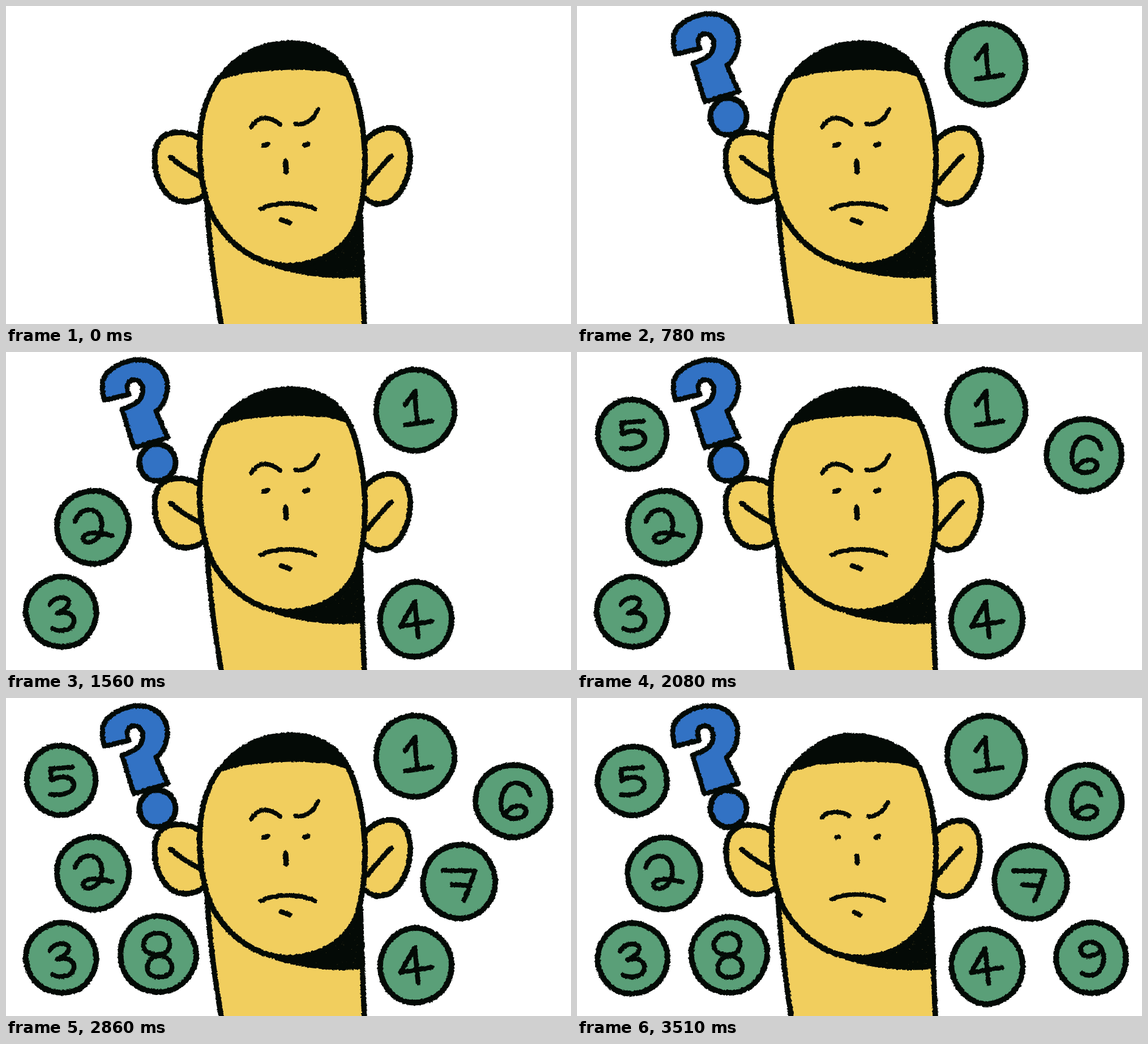
These frames come from a looping animation (998x561 px, 3640 ms). An HTML page:

```html
<!DOCTYPE html>
<html lang="en">
<head>
<meta charset="utf-8">
<title>Counting thoughts</title>
<style>
html, body { margin: 0; width: 100%; height: 100%; overflow: hidden; background: #fff; }
svg { display: block; width: 100vw; height: 100vh; }
path { stroke-linecap: round; stroke-linejoin: round; }
</style>
</head>
<body>
<svg viewBox="0 0 998 561">
  <filter id="rough" filterUnits="userSpaceOnUse" x="0" y="0" width="998" height="580" color-interpolation-filters="sRGB">
    <feTurbulence id="noise" type="fractalNoise" baseFrequency=".25" numOctaves="2" seed="1"/>
    <feDisplacementMap in="SourceGraphic" scale="4" xChannelSelector="R" yChannelSelector="G"/>
  </filter>
  <g id="art" filter="url(#rough)"></g>
</svg>
<script>
const INK = '#040a06', SKIN = '#f1ce5e', GREEN = '#5a9f78', BLUE = '#3272c4';
const STEP = 130, STEPS = 28;
const art = document.getElementById('art');
const noise = document.getElementById('noise');

const path = (d, width = 8, fill = 'none', stroke = INK) =>
  `<path d="${d}" fill="${fill}" stroke="${stroke}" stroke-width="${width}"/>`;
const move = (x, y, content) => `<g transform="translate(${x} ${y})">${content}</g>`;

// Slightly lumpy ellipse
function blob(x, y, rx, ry, seed, fill) {
  let d = '';
  for (let i = 0; i < 60; i++) {
    const a = i * Math.PI / 30;
    const k = 1 + .006 * Math.sin(2 * a + seed * 2.3) + .007 * Math.sin(3 * a + seed * 1.7)
      + .005 * Math.sin(5 * a + seed);
    d += `${i ? 'L' : 'M'}${(x + rx * k * Math.cos(a)).toFixed(1)} ${(y + ry * k * Math.sin(a)).toFixed(1)}`;
  }
  return path(d + 'Z', 10, fill);
}

// Step of appearance, ellipse, digit stroke
const bubbles = [
  { at: 6, e: [722.5, 102.5, 69, 72], d: 'M705 93L723 69C722 90 725 108 727 126M705 129L752 122' },
  { at: 8, e: [153.5, 309, 64, 64], d: 'M122 299C127 283 140 276 153 279C172 284 173 312 163 326C154 338 138 339 136 329C137 317 158 317 187 324' },
  { at: 10, e: [97.5, 458.5, 62, 62], d: 'M77 446C85 431 108 430 111 440C113 449 99 457 91 461C108 456 122 464 120 476C118 493 95 494 82 488' },
  { at: 12, e: [724, 472, 63, 66], d: 'M752 475L697 484L722 441L728 503' },
  { at: 14, e: [97.5, 145, 61, 61], d: 'M117 122L79 125L80 145C100 134 121 140 120 154C119 167 100 173 79 170' },
  { at: 16, e: [896, 181.5, 66, 64], d: 'M926 171C920 149 896 144 884 157C872 172 870 200 884 209C900 217 919 211 919 199C917 187 893 186 881 206' },
  { at: 18, e: [800.5, 324, 64, 65], d: 'M772 304L828 305Q820 332 809 357M788 329L815 331' },
  { at: 21, e: [268.5, 452, 67, 67], d: 'M264 415C284 412 296 430 285 446C275 457 250 453 244 442C240 430 248 417 264 415M268 455C290 453 300 475 288 487C275 496 255 494 250 480C248 465 258 456 268 455' },
  { at: 24, e: [908, 457.5, 62, 62], d: 'M928 443C922 428 897 425 891 440C888 458 912 461 928 443C937 465 925 488 908 489Q899 489 893 485' }
];

// Each group holds three hand-drawn variants
const drawings = {
  leftBrow: ['M433 214C445 193 465 193 484 209', 'M432 212C445 195 466 197 483 209', 'M433 210C445 198 465 198 481 208'],
  rightBrow: ['M511 208C530 212 545 198 551 182', 'M513 208C530 210 545 198 550 182', 'M515 209C530 210 543 198 549 184'],
  mouth: ['M450 358C475 345 520 345 546 358', 'M453 355C475 345 520 344 544 358', 'M450 355C475 343 520 344 542 357'],
  nose: ['M494 274L495 293', 'M493 277L495 293', 'M494 279L495 291'],
  chin: ['M486 377L501 382', 'M489 378L499 383', 'M490 378L500 383'],
  eyes: ['M455 246L462 244M528 245L534 244', 'M456 246L460 244M527 245L533 243', 'M458 246L462 245M528 246L533 244']
};
const hairTop = [[502, 61], [494, 63], [482, 62]];
const shadow = 'M626 365L630 477C580 482 530 478 475 461C560 465 610 420 626 365Z';

function grain() {
  let seed = 7, dots = '';
  const rand = () => (seed = seed * 16807 % 2147483647) / 2147483647;
  for (let i = 0; i < 60; i++)
    dots += `<circle cx="${500 + rand() * 128}" cy="${385 + rand() * 92}" r=".6"/>`;
  return `<clipPath id="shade"><path d="${shadow}"/></clipPath>
    <g clip-path="url(#shade)" fill="#4a401e">${dots}</g>`;
}

function question(pose) {
  return move(pose ? -1 : 0, 0,
    path('M174 85L217 75C211 62 214 49 227 49C241 50 245 68 238 81C231 92 219 96 205 101L226 169L286 151L265 105C282 92 287 70 284 50C278 25 255 12 230 14C205 16 178 30 171 50C169 62 171 74 174 85Z', 9, BLUE))
    + blob(267.5, 195, 32, 32.5, 4 + pose * .6, BLUE);
}

function man(pose) {
  const [hx, hy] = hairTop[pose], s = pose ? 1 : 0;
  const line = (name, width) => path(drawings[name][pose], width);
  const neckX = 380 - 2 * s;
  return path(`M355 340L${neckX} 590L634 590L626 365Z`, 0, SKIN, 'none')
    + path(`M354 335C358 410 366 480 ${neckX} 561l3 25M626 370Q629 470 633 561v25`, 9.5)
    + path(shadow, 2, INK) + grain()
    + move(s, s, path('M342 234C325 222 300 220 283 227C265 236 261 255 263 280C266 310 282 337 305 344C325 348 340 342 352 332', 10, SKIN)
      + path('M290 266Q315 288 347 303', 9))
    + move(-2 * s, s, path('M634 238C645 225 660 215 680 215C705 216 714 240 714 268C713 300 700 335 675 346C660 351 645 350 636 340', 10, SKIN)
      + path('M680 265Q660 285 638 313', 9))
    + path(`M377 126C352 160 342 205 ${342 + s * 2} 250C342 300 351 345 368 376C396 421 440 457 500 458C560 456 605 425 621 380C632 340 635 300 634 262C632 210 620 150 603 120L500 90Z`, 10, SKIN)
    + path(`M376 124C400 92 440 ${hy + 1} ${hx} ${hy + 1}C${hx + 54} ${hy + 1} 590 88 606 119Q560 111 500 111Q420 115 376 124Z`, 3, INK)
    + line('leftBrow', 8) + line('rightBrow', 8) + line('eyes', 9)
    + line('nose', 9.5) + line('mouth', 8) + line('chin', 9);
}

function draw(step) {
  // The three-pose cycle lingers once in the middle
  const pose = (step < 15 ? step : step - 1) % 3;
  const s = pose ? 1 : 0;
  noise.setAttribute('seed', pose + 1);
  art.innerHTML = (step >= 3 ? question(pose) : '') + man(pose)
    + bubbles.filter(b => step >= b.at).map((b, i) => {
      const [x, y, rx, ry] = b.e;
      return blob(x + s * .5, y + s, rx, ry, i + 1 + pose * .7, GREEN)
        + move(-s, s * .5, path(b.d, 8.5));
    }).join('');
}

let shown = -1;
const start = performance.now();
function tick() {
  const step = Math.floor((performance.now() - start) / STEP) % STEPS;
  if (step !== shown) draw(shown = step);
  requestAnimationFrame(tick);
}
tick();
</script>
</body>
</html>
```
